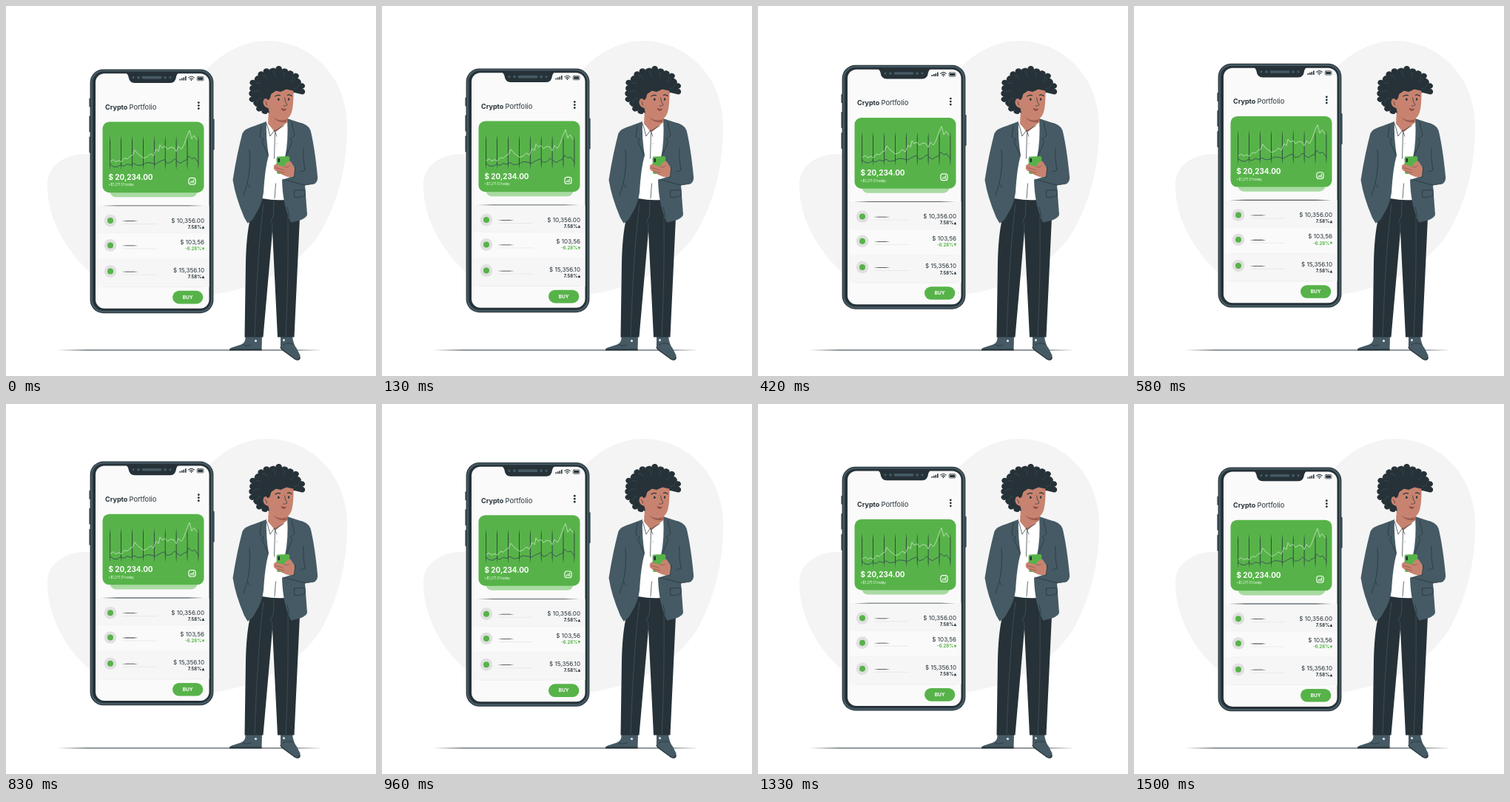
Animation, 500 px wide and 500 px high, one loop 1540 ms. Source, as an HTML page:

```html
<!DOCTYPE html>
<html lang="en">
<head>
<meta charset="utf-8">
<title>Portfolio</title>
<style>
  html, body { margin: 0; width: 100%; height: 100%; overflow: hidden; background: #fff; }
  svg { display: block; width: 100vw; height: 100vh; }
  text { font-family: Inter, "Open Sans", sans-serif; fill: #263238; }
  .b { font-weight: 700; }
  .w { fill: #fff; }
  .end { text-anchor: end; }
  .dark { fill: #263238; }
  .slate { fill: #455a64; }
  .green { fill: #57b349; }
  .skin { fill: #c78370; }
  .ln { fill: none; stroke: #263238; stroke-width: .7; stroke-linecap: round; stroke-linejoin: round; }
</style>
</head>
<body>
<svg viewBox="0 0 500 500">
  <path fill="#f4f4f4" d="M56 246C54 218 76 200 108 200C150 200 180 230 215 190C250 150 242 115 272 85C296 60 324 47 354 47C412 48 461 95 461 163C461 215 450 262 425 306C397 349 345 380 285 389C215 398 150 388 112 358C84 334 57 290 56 246Z"/>
  <path d="M69 465L110 464.600H385L428 465L385 465.400H110Z" class="dark"/>

  <g id="phone">
    <g class="slate">
      <rect x="112.300" y="125" width="3" height="12" rx="1"/>
      <rect x="112.300" y="149" width="3" height="22" rx="1"/>
      <rect x="112.300" y="177" width="3" height="22" rx="1"/>
      <rect x="278.500" y="153" width="3.200" height="42" rx="1"/>
    </g>
    <rect x="113.600" y="85.800" width="166.800" height="329.800" rx="18" class="dark"/>
    <rect x="114.600" y="86.800" width="164.800" height="327.800" rx="17" class="slate"/>
    <rect x="117" y="89" width="160" height="323.200" rx="15" class="dark"/>
    <rect x="121" y="91.700" width="153.500" height="317.500" rx="12" fill="#fafafa"/>
    <path class="dark" d="M160 90H235Q231 91.500 230 96Q229 104.500 222 104.500H174Q166.500 104.500 165.500 96Q164.500 91.500 160 90Z"/>
    <g class="slate">
      <rect x="183.500" y="95.200" width="27" height="3.600" rx="1.800"/>
      <circle cx="172" cy="97" r="1.600"/><circle cx="179" cy="97" r="1.900"/>
      <circle cx="215" cy="97" r="1.900"/><circle cx="222" cy="97" r="1.600"/>
    </g>
    <g class="dark">
      <path d="M234.500 99h1.600v2h-1.600zM237 98h1.600v3h-1.600zM239.500 97h1.600v4h-1.600zM242 95.500h1.600v5.500h-1.600z"/>
      <circle cx="250.500" cy="100.400" r=".9"/>
      <circle cx="260.300" cy="131" r="1.400"/><circle cx="260.300" cy="135" r="1.400"/><circle cx="260.300" cy="139" r="1.400"/>
      <rect x="259.200" y="96.800" width="6.800" height="3.400"/>
    </g>
    <path class="ln" style="stroke-width:1.100" d="M246.800 97.300Q250.500 94 254.200 97.300M248.500 99Q250.500 97.200 252.500 99"/>
    <rect x="258.200" y="95.800" width="8.800" height="5.400" rx="1.200" class="ln"/>

    <text x="134" y="140.400" font-size="9" class="b">Crypto</text>
    <text x="166.500" y="140.400" font-size="9.300">Portfolio</text>

    <rect x="140.500" y="230" width="118" height="28.700" rx="8" fill="#a9daa2"/>
    <rect x="130.500" y="157" width="137" height="95.600" rx="9" class="green"/>
    <path id="grid" class="dark"/>
    <path class="ln" style="stroke:#37505a;stroke-width:.9" d="M141 214.500L145 217.500L150 218L155 215L159 217L164 214L169 215.500L173 213L178 216L184 215L190 212L196 212.500L202 214L208 210.500L214 208L218 213L223 211.500L228 207L232 211L236 213L240 210L244 208.500L247 203L251 207L255 205.500L260 212.500"/>
    <path class="ln" style="stroke:#e3f5df;stroke-width:.65" d="M141 210.500L145 208L148 211L152 209L156 211L160 206L164 207L168 203L171 202L174 195L178 200L182 203L186 206L191 204L195 200L199 203L203 194L206 197L208 188L211 192L215 190L218 194L223 191L227 192L230 197L233 190L237 194L240 189L243 181L245 175L248 168.500L251 180L254 175.500L258 181"/>
    <text x="138.500" y="235" font-size="9.900" class="b w">$ 20,234.00</text>
    <text x="138.500" y="243.800" font-size="4.400" class="w">+$1,271.51 today</text>
    <g class="ln" style="stroke:#fff;stroke-width:1.100">
      <rect x="246.900" y="232.800" width="9.200" height="8.800" rx="3"/>
      <path d="M249.500 239.200v-1.500M251.500 239.200v-2.500M253.500 239.200v-4"/>
    </g>

    <g id="rows"></g>
    <path class="dark" d="M129 270.300L150 269.900H246L267 270.300L246 270.700H150Z"/>
    <rect x="225" y="385.200" width="41.300" height="17.600" rx="8.800" class="green"/>
    <text x="245.700" y="396.300" font-size="6.500" text-anchor="middle" class="b w">BUY</text>
  </g>

  <g id="man">
    <!-- shoes -->
    <path class="slate" d="M323.500 446H346L345.500 465H302Q302 462 307 461L319 457Q324 454 323.500 446Z"/>
    <path class="dark" d="M302 463.500H345.500V465.500H302Z"/>
    <path class="slate" d="M371 446H387Q388 457 393 463L397.500 472V477Q396 479.500 392 478L374 465Q370 462 371 455Z"/>
    <path class="ln" style="stroke-width:1.300" d="M371 461Q372 464 378 468L391 477.500Q396 479.500 397 475"/>
    <path class="ln" d="M319 457Q325 461 331 458M374 458Q381 454 388 457"/>
    <circle cx="337.500" cy="452.500" r="1.600" fill="#e4e8ea"/><circle cx="375.500" cy="451.500" r="1.500" fill="#e4e8ea"/>

    <!-- trousers -->
    <path class="dark" d="M347 258H378L397 286L389.500 447.500H367L360 304L347.500 447.500H322.500L324 345Q325 308 330 288Z"/>
    <path class="ln" style="stroke:#455a64" d="M362 264L361.500 283L357 293M348 268Q340 330 336 446M360 304L359.500 294M381 285Q382 370 378 446"/>

    <!-- shirt and neck -->
    <path fill="#fff" d="M351 159L380 153L386 170L377 262Q362 263 346 260Z"/>
    <path class="skin" d="M355 141L380 150L380 157L364 171L354 159Z"/>
    <path fill="#9c5c50" d="M360 149Q368 156 379 153V157Q367 159 360 149Z"/>
    <path class="ln" d="M352.500 159.500L357 176L363 167.500M363 169L375 162M363 169L366 176M363.500 171L362.500 206M366 186h.1M364.500 240L363 260"/>

    <!-- jacket -->
    <path class="slate" d="M352 156L336 162Q322 166 319.500 172Q312 200 306.500 235Q310 258 322 286L326.500 293.500Q333 291 337 282Q346 268 348 252Q350 218 355 202Q351 178 352 156Z"/>
    <path class="slate" d="M380 152L395 157Q409 160 411.500 168Q417 190 421 230Q422 239 415 241L404 242L407 282Q405 289 385 292.500Q374 270 373 235L388 230L389 217L377 205Q382 182 380 152Z"/>
    <path class="ln" d="M329 194Q331 219 326 240L321 256M326 240L330 245M345 161L343 177L348 180L346 184L354 201M386 157L390 175L384 180L387 183L378 204M402 192Q401 205 404 222L398 224M374 234Q388 238 404 242M389 232L391 218M404 242L410 241"/>
    <path class="ln" d="M390 249L404 248.500L404.500 256Q397 260 390 258.500ZM380 272L383 284"/>

    <!-- hand and handset -->
    <path class="skin" d="M362 218Q361 215 366 213L372 214L377 209Q382 206 386 212L390 219L389 230Q383 232 378 230L367 225Z"/>
    <path class="green" d="M367.500 203.500L381 203Q383.500 203 383.300 205.500L381 225Q380.500 227 378 227H368.500Q366 227 366 224.500L365.500 206Q365.500 203.500 367.500 203.500Z"/>
    <rect x="367.300" y="205.800" width="2.800" height="5.500" rx="1.200" class="dark"/>
    <path class="skin" d="M362 217Q363 214 367 214.500L376 217L378 213Q381 208 386 213L390 220L388 231Q380 231 374 228L365 223Q361 221 362 217Z"/>
    <path class="ln" style="stroke:#8f5147" d="M364 218.500L375 221.500M367 223L376 225.500M376 217Q381 219 383 216"/>

    <!-- head -->
    <path id="hair" class="dark"/>
    <path class="skin" d="M354 126Q349 123 347.500 129Q347 136 354.500 138L356 145Q362 154 373 154.500Q382 154 385.500 145Q389 135 388.500 111L377 108L362 114Q357 121 354 126Z"/>
    <path class="dark" d="M353 127Q357 128 358 119L365 114.500L371 116L379 112.500L390 115L393 102L360 102L350 120Z"/>
    <path class="ln" style="stroke:#455a64;stroke-width:.5" id="curls"/>
    <path class="ln" style="stroke-width:1.200" d="M364 122Q367 119.500 370.500 121M380.500 120.500Q383 119 386 121.500"/>
    <ellipse cx="368.300" cy="126.300" rx="1.300" ry="1.700" class="dark"/><ellipse cx="382" cy="126" rx="1.200" ry="1.700" class="dark"/>
    <path class="ln" d="M376.500 124Q377 130 380 133.500Q378 136 375 135M350 129Q352.500 130 352.500 134"/>
    <path fill="#8f4a42" d="M371.500 137.500Q375 140 379.500 138.500Q377 142.500 374 141.500Q372 140.500 371.500 137.500Z"/>
  </g>
</svg>
<script>
  const LOOP = 1540, REACH = 4.2, PEAK = 1490, LIFT = .4;
  const $ = id => document.getElementById(id);
  const range = (n, f) => Array.from({ length: n }, (_, i) => f(i)).join("");

  $("grid").setAttribute("d", range(9, i =>
    `M${140.7 + i * 14.9} 175.500l.4 8v31l-.4 8l-.4-8v-31z`));

  // y: badge centre; top and h: row band; base: price baseline
  const rows = [
    { y: 290.5, price: "$ 10,356.00", change: "7.58%", up: true, top: 270.5, h: 37, base: 293.1 },
    { y: 323.8, price: "$ 103,56", change: "-6.28%", up: false, top: 307.5, h: 35, base: 322.5 },
    { y: 359, price: "$ 15,356.10", change: "7.58%", up: true, top: 342.5, h: 37.5, base: 360.4 }
  ];
  $("rows").innerHTML = rows.map(r => {
    const tint = r.up ? "#263238" : "#57b349", low = r.base + 8.1;
    const tip = r.up ? `M264.600 ${low}h3.600l-1.800-3.800z` : `M264.600 ${low - 3.8}h3.600l-1.800 3.800z`;
    return `<rect x="121" y="${r.top}" width="153.500" height="${r.h}" fill="${r.up ? "#f6f6f6" : "#fafafa"}"/>
      <path d="M131 ${r.top + r.h}H267" stroke="#e6e6e6" stroke-width=".6"/>
      <circle cx="141" cy="${r.y}" r="8.300" fill="#e0e0e0"/>
      <circle cx="141" cy="${r.y}" r="4" class="green"/>
      <path class="dark" d="M156.500 ${r.y + .5}l6-.4h10l6 .4-6 .4h-10z"/>
      <path d="M157 ${r.y + 4.5}H204" stroke="#e0e0e0" stroke-width=".6"/>
      <text x="268" y="${r.base}" font-size="8.100" class="end">${r.price}</text>
      <text x="264.300" y="${low}" font-size="6" class="b end" style="fill:${tint}">${r.change}</text>
      <path d="${tip}" fill="${tint}"/>`;
  }).join("");

  // Curly outline: lobes around an ellipse, open over the face
  const at = (a, k) => `${(366 + 35 * k * Math.cos(a)).toFixed(1)} ${(116 + 31 * k * Math.sin(a)).toFixed(1)}`;
  const lobes = 18, from = 1.95, step = 4.45 / lobes;
  $("hair").setAttribute("d", "M" + at(from, .97) + range(lobes, i => {
    const a = from + i * step, k = 1.11 + .06 * Math.sin(i * 2.4);
    return `C${at(a - .02, k)} ${at(a + step * .9, k + .05)} ${at(a + step, .98)}`;
  }) + "L390 117L360 122L357 145Z");
  $("curls").setAttribute("d", range(8, i => {
    const a = 2.6 + i * .48;
    return `M${at(a, .9)}Q${at(a + .16, .84)} ${at(a + .1, .68)}`;
  }));

  const wave = t => REACH * Math.cos(2 * Math.PI * (t - PEAK) / LOOP);
  function draw(t) {
    $("phone").setAttribute("transform", `translate(0 ${(wave(t) - wave(0) - LIFT).toFixed(3)})`);
  }
  const start = performance.now();
  function tick(now) {
    draw(Math.max(0, now - start) % LOOP);
    requestAnimationFrame(tick);
  }
  draw(0);
  requestAnimationFrame(tick);
</script>
</body>
</html>
```
